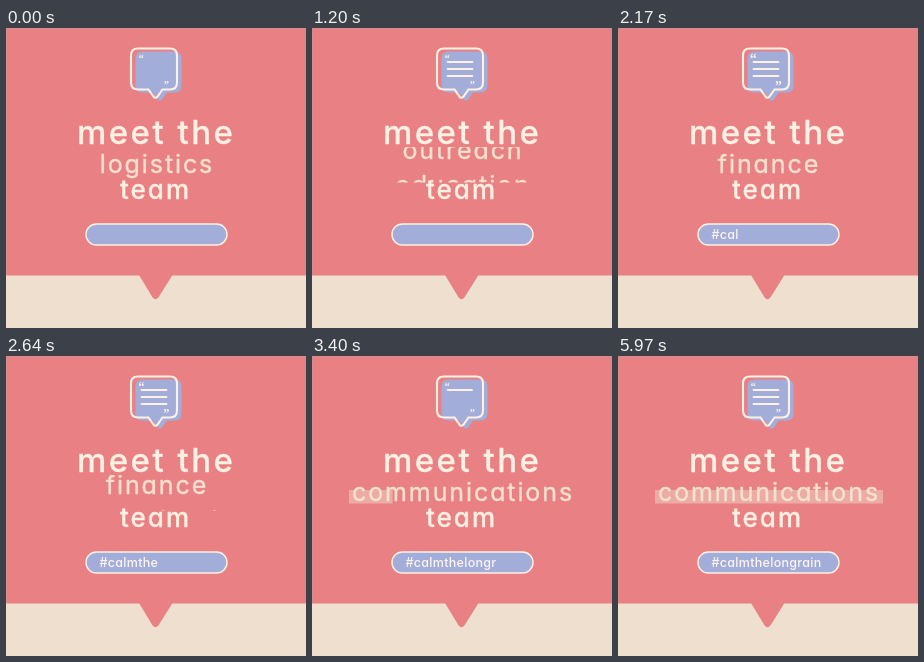
These frames come from a looping animation (300x300 px, 6000 ms). An HTML page:

```html
<!DOCTYPE html>
<html lang="en">
<head>
<meta charset="utf-8">
<title>Meet the team</title>
<style>
  html, body { margin: 0; width: 100%; height: 100%; overflow: hidden; background: #e98083; }
  svg { display: block; width: 100vw; height: 100vh; }
  text {
    font-family: Inter, Lato, sans-serif;
    font-weight: 500;
    font-feature-settings: "cv11";
    stroke-linejoin: round;
  }
  .head { fill: #fdf1e3; stroke: #fdf1e3; stroke-width: .3; text-anchor: middle; }
  .word { fill: #f4e1cf; stroke: #f4e1cf; stroke-width: .4; text-anchor: middle; font-size: 25px; font-weight: 400; letter-spacing: 1.9px; }
  .quote { fill: #fdf1e3; font: 700 11px "Noto Serif", "Liberation Serif", serif; text-anchor: middle; }
  .rule { stroke: #fdf1e3; stroke-width: 1.8; stroke-linecap: round; }
</style>
</head>
<body>
<svg viewBox="0 0 300 300">
  <defs>
    <clipPath id="slot"><rect x="0" y="119" width="300" height="35.5"/></clipPath>
    <path id="bubble" d="M132 20.5H164Q171 20.5 171 27.5V54.5Q171 61.5 164 61.5H156.5L151.5 68.5Q149.5 71 147.5 68.5L142.5 61.5H132Q125 61.5 125 54.5V27.5Q125 20.5 132 20.5Z"/>
  </defs>
  <rect width="300" height="300" fill="#e98083"/>
  <path d="M.5 247V.5H300" fill="none" stroke="#c39a9a" opacity=".5"/>
  <rect y="247.5" width="300" height="53" fill="#eedfcf"/>
  <path d="M133 247L146.3 269Q149.5 273.5 152.7 269L166.5 247Z" fill="#e98083"/>

  <use href="#bubble" x="4.5" y="3" fill="#a3add9"/>
  <use href="#bubble" fill="none" stroke="#fdf1e3" stroke-width="2.1"/>
  <g id="rules"></g>
  <g id="open"><text class="quote" y="6.3">“</text></g>
  <g id="close"><text class="quote" y="6.3">”</text></g>

  <text class="head" x="150.2" y="116" font-size="33" letter-spacing="2.5">meet the</text>
  <rect id="mark" x="37" y="134" width="0" height="13.5" fill="#f0dfcf" opacity=".45"/>
  <g clip-path="url(#slot)"><g id="words"></g></g>
  <text class="head" x="149.5" y="170.7" font-size="26" letter-spacing="2">team</text>

  <rect x="80" y="196" width="141" height="21" rx="10.5" fill="#a3add9" stroke="#fdf1e3" stroke-width="1.4"/>
  <text id="tag" x="93.5" y="210.5" font-size="12.5" letter-spacing=".3" fill="#fdf5ee"></text>
</svg>
<script>
const LOOP = 6000, CYCLE = 3000, STEP = 35;
const NAMES = ['logistics', 'outreach', 'education', 'finance', 'communications'];
const TAG = '#calmthelongrain';

const $ = id => document.getElementById(id);
const clamp = v => Math.min(1, Math.max(0, v));
const span = (t, start, length) => clamp((t - start) / length);
const easeInOut = (p, n) => p < .5 ? (2 * p) ** n / 2 : 1 - (2 - 2 * p) ** n / 2;

function add(parent, tag, attrs, label = '') {
  const el = document.createElementNS('http://www.w3.org/2000/svg', tag);
  for (const key in attrs) el.setAttribute(key, attrs[key]);
  el.textContent = label;
  return parent.appendChild(el);
}

NAMES.forEach((name, i) =>
  add($('words'), 'text', { class: 'word', x: 151, y: 145 + i * STEP }, name));
const rules = [34, 41, 48].map(y =>
  add($('rules'), 'line', { class: 'rule', x1: 135.5, x2: 135.5, y1: y, y2: y }));

function drawBubble(t) {
  rules.forEach((rule, i) => {
    const p = easeInOut(span(t, 30 + i * 390, 410), 2);
    rule.setAttribute('x2', 135.5 + 25 * p);
    rule.setAttribute('visibility', p > .02 ? 'visible' : 'hidden');
  });
  const size = 1 + .3 * Math.sin(Math.PI * span(t, 1640, 1260));
  $('open').setAttribute('transform', `translate(135.3 28) scale(${size})`);
  $('close').setAttribute('transform', `translate(160.5 55) scale(${size})`);
}

function draw(t) {
  drawBubble(t % CYCLE);

  let shift = 0;
  for (let i = 0; i < NAMES.length - 1; i++) {
    shift += STEP * easeInOut(span(t, 307 + 736 * i, 340), 3);
  }
  $('words').setAttribute('transform', `translate(0 ${-shift})`);

  $('mark').setAttribute('width', 228 * easeInOut(span(t, 3200, 650), 2));

  const typed = Math.max(0, Math.floor((t - 1690) / 133) + 1);
  $('tag').textContent = TAG.slice(0, typed);
}

const begin = performance.now();
function frame() {
  draw((performance.now() - begin) % LOOP);
  requestAnimationFrame(frame);
}
draw(0);
requestAnimationFrame(frame);
</script>
</body>
</html>
```
